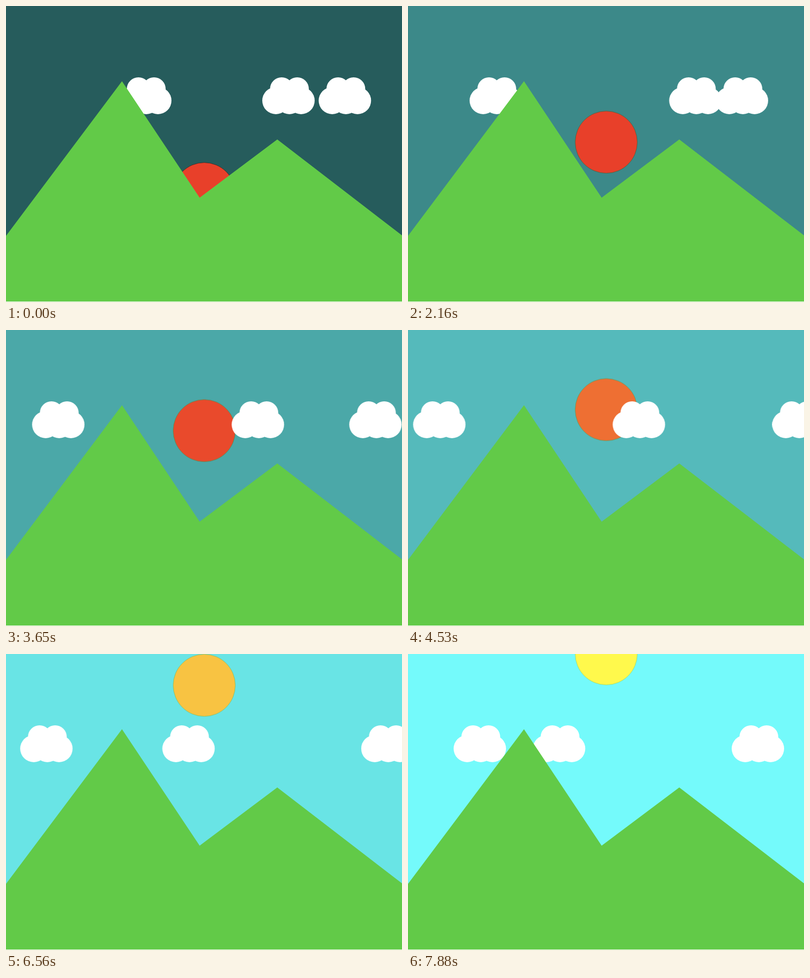
Write an HTML page that moves like this. It is 816 px wide and 610 px high and loops after 8 s.

```html
<!DOCTYPE html>
<html lang="en">
<head>
<meta charset="utf-8">
<title>Sunrise</title>
<style>
  html, body { margin: 0; width: 100%; height: 100%; overflow: hidden; background: #fff; }
  svg { display: block; width: 816px; height: 609px; --travel: 387px; --turn: 263px; }

  .sky, .sun, .rise, .bounce, .drift { animation: 8s linear infinite; }
  .sky { animation-name: dawn; }
  .sun { animation-name: warm, rim; }
  .rise { animation-name: rise; }
  .drift { animation-name: drift; }
  .bounce { animation-name: bounce; }
  .west { --dir: -1; }
  .east { --dir: 1; }

  /* Everything rests for the last moment of the loop. */
  @keyframes dawn {
    0% { fill: rgb(38 92 92); }
    95%, 100% { fill: rgb(116 250 251); }
  }
  @keyframes warm {
    0%, 42.5% { fill: rgb(232 64 42); }
    98.5%, 100% { fill: rgb(255 249 76); }
  }
  @keyframes rim {
    0% { stroke: rgb(65 48 42); }
    98.5%, 100% { stroke: rgb(155 220 115); }
  }
  @keyframes rise {
    98.5%, 100% { transform: translateY(calc(-1 * var(--travel))); }
  }
  @keyframes drift {
    98.5%, 100% { transform: translateX(calc(-1 * var(--travel))); }
  }
  /* Out to the turning point, then back at the same speed. */
  @keyframes bounce {
    66.95% { transform: translateX(calc(var(--dir) * var(--turn))); }
    98.5%, 100% { transform: translateX(calc(var(--dir) * (2 * var(--turn) - var(--travel)))); }
  }
</style>
</head>
<body>
<svg viewBox="0 0 816 609">
  <defs>
    <g id="cloud" fill="#fff">
      <circle cx="40" cy="171" r="24"/>
      <circle cx="72" cy="171" r="24"/>
      <circle cx="28" cy="195" r="28"/>
      <circle cx="56" cy="195" r="28"/>
      <circle cx="80" cy="195" r="28"/>
    </g>
  </defs>
  <rect class="sky" width="816" height="609"/>
  <g class="rise"><circle class="sun" cx="408.5" cy="386.7" r="64"/></g>
  <g class="bounce west"><use href="#cloud" x="233"/></g>
  <g class="bounce east"><use href="#cloud" x="528"/></g>
  <g class="drift"><use href="#cloud" x="644.3"/></g>
  <path fill="#62ca48" d="M-1 475L239 155L399 395L559 275L819 475V609H-1Z"/>
</svg>
</body>
</html>
```
